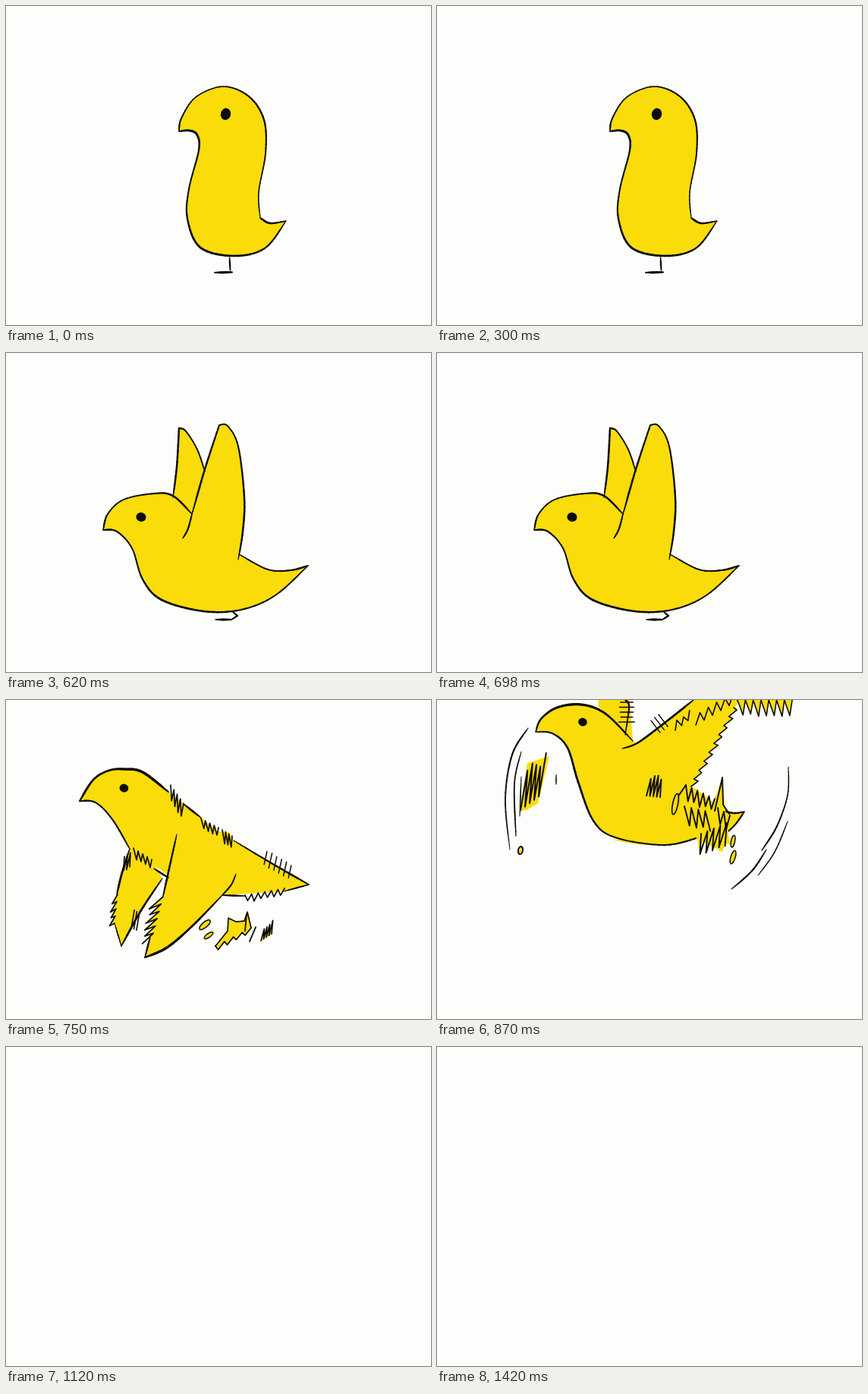
Recreate the animation shown at these times as an HTML page with a canvas. Size 560 by 420 pixels, loop 1.62 s.

```html
<!DOCTYPE html>
<html lang="en">
<head>
<meta charset="utf-8">
<title>Yellow bird takes off</title>
<style>
html, body { margin: 0; width: 100%; height: 100%; overflow: hidden; background: #fdfdfb; }
canvas { display: block; width: 560px; height: 420px; }
</style>
</head>
<body>
<canvas id="stage" width="560" height="420"></canvas>
<script>
const ctx = document.getElementById('stage').getContext('2d');
const PAPER = '#fdfdfb', YELLOW = '#f9dc0a', INK = '#0c0b06';
ctx.lineCap = ctx.lineJoin = 'round';

const mix = (a, b, t) => a + (b - a) * t;
const wobble = i => 0.85 + 0.3 * Math.abs(Math.sin(i * 12.9898) * 43758.5453 % 1);

// Smooth curve through a few places; "|" marks a corner.
function curve(text) {
  const out = [];
  let last;
  for (const part of text.split('|')) {
    const n = part.trim().split(' ').map(Number), p = last ? [last] : [];
    while (n.length) p.push(n.splice(0, 2));
    last = p[p.length - 1];
    for (let i = 0; i < p.length - 1; i++) {
      const b = p[i], c = p[i + 1], a = p[i - 1] || b, d = p[i + 2] || c;
      for (let t = 0; t < 1; t += 0.125) {
        out.push([0, 1].map(j => b[j] + t * ((c[j] - a[j]) / 2 +
          t * (a[j] - 2.5 * b[j] + 2 * c[j] - d[j] / 2 +
          t * (1.5 * (b[j] - c[j]) + (d[j] - a[j]) / 2)))));
      }
    }
  }
  return [...out, last];
}

// Zigzag from one place to another, every second point pushed aside.
function zig(n, x0, y0, x1, y1, dx, dy) {
  return Array.from({ length: n + 1 }, (_, i) => {
    const k = i % 2 * wobble(i + x0);
    return [mix(x0, x1, i / n) + dx * k, mix(y0, y1, i / n) + dy * k];
  });
}

const back = line => [...line].reverse();

function trace(points) {
  ctx.beginPath();
  points.forEach(p => ctx.lineTo(...p));
}

function fill(...lines) {
  trace(lines.flat());
  ctx.fillStyle = YELLOW;
  ctx.fill();
}

function scratch(w, ...lines) {
  ctx.strokeStyle = INK;
  ctx.lineWidth = w;
  for (const line of lines) {
    trace(line);
    ctx.stroke();
  }
}

// Brush line whose weight swells gently and thins at both ends.
function ink(w, ...lines) {
  for (const p of lines) {
    const n = p.length - 1;
    for (let i = 0; i < n; i++) {
      const end = Math.min(1, 0.6 + Math.min(i, n - 1 - i) / 8);
      scratch(w * end * (1 + 0.18 * Math.sin(i * 0.16 + p[0][0])), [p[i], p[i + 1]]);
    }
  }
}

// Row of short hairs centred on a line.
function comb(w, n, x0, y0, x1, y1, dx, dy) {
  for (let i = 0; i < n; i++) {
    const x = mix(x0, x1, i / (n - 1)), y = mix(y0, y1, i / (n - 1));
    const k = wobble(i + x0) / 2;
    scratch(w, [[x - dx * k, y - dy * k], [x + dx * k, y + dy * k]]);
  }
}

function oval(x, y, rx, ry, turn, color, line) {
  ctx.beginPath();
  ctx.ellipse(x, y, rx, ry, turn, 0, 7);
  ctx.fillStyle = color;
  ctx.fill();
  if (line) {
    ctx.strokeStyle = INK;
    ctx.lineWidth = line;
    ctx.stroke();
  }
}

const eye = (x, y, rx, ry) => oval(x, y, rx, ry, 0.25, INK);

function foot(leg, sole, w = 3) {
  ink(2.4, curve(leg));
  ink(w, curve(sole));
}

function standing() {
  const spine = curve('228 165 231 148 250 120 286 106 320 119 340 150 342 194 333 245 335 279');
  const tail = curve('335 279 348 286 369 283');
  const belly = curve('369 283 341 319 300 329 256 318 239 280 241 241 254 190 252 170 242 164 228 165');
  fill(spine, tail, belly);
  ink(1.9, spine);
  ink(2.4, tail, belly);
  eye(289.5, 142.3, 6.6, 7.8);
  foot('294.5 331 295.5 348', '275 351 298 350.5', 3.8);
}

function feathering() {
  const head = curve('140 213 152 186 178 173 205 170 232 175 260 206');
  const chest = curve('140 213 156 215 173 230 180 268 203 307 255 331 300 335 350 323 403 283');
  const tail = curve('403 283 385 287 350 284 313 261');
  const wing = curve('242 234 262 203 310 164 345 152 375 152');
  const tips = zig(9, 375, 152, 338, 207, 3, -8);
  const inner = curve('338 207 322 236 312 269');
  const rear = curve('282 106 281 140 279 187');
  fill(curve('234 179 248 138 282 106|285 112 281 120'), rear, [[258, 206]]);
  fill(head, back(tail), back(chest));
  fill(wing, tips, inner, [[260, 285]]);
  ink(2.2, head, chest, tail, inner);
  ink(2, wing, rear, curve('234 179 242 151 252 135'));
  scratch(2.1, tips);
  comb(1.6, 8, 254, 131, 277, 110, -1, 26);
  comb(1.6, 9, 318, 160, 356, 145, 1, 31);
  const top = zig(9, 334, 204, 372, 201, 2, 11);
  const side = curve('372 201 380 228 376 262');
  const hem = zig(9, 376, 262, 337, 228, 0, -13);
  fill(top, side, hem);
  scratch(2, top, hem);
  ink(2.3, side);
  oval(319.5, 206, 1.4, 7.3, 0, '#544a0a', 1.6);
  eye(190, 200, 6.7, 6.4);
  foot('295 336 303 342|298 349', '276 351 298 350.5');
}

function wingsUp() {
  const rear = curve('220 190 225 150 228 99|237 103 252 127 262 156');
  const head = curve('128 233 134 212 155 193 195 185 220 188 245 212');
  const wing = curve('246 209 262 153 281 95|292 96 306 123 314 190 312 235 306 272');
  const under = curve('128 233 146 235 166 257 180 298 205 325 260 340 310 338 355 319 398 280');
  const tail = curve('398 280 375 286 345 285 307 265');
  fill(rear, [[245, 212]]);
  fill(head, back(tail), back(under));
  fill(wing, [[246, 272]]);
  ink(2.1, rear, head, wing);
  ink(2.3, under, tail);
  ink(1.8, curve('233 244 240 231 246 208'));
  eye(178, 216, 6.6, 6);
  foot('299 341 305 346|297 351', '276 351 297 351');
}

function downstroke() {
  const head = curve('97 133 115 105 135 93 155 91 180 95 214 121');
  const chest = curve('97 133 118 135 140 157 163 196');
  const spine = curve('300 185 350 215 399 243');
  const rearEdge = curve('163 196 153 227 146 256');
  const rearTuft = zig(8, 147, 256, 143, 294, -7, 8);
  const rearTip = curve('143 294 152 324');
  const rearBack = curve('152 324 178 277 206 235');
  const wing = curve('225 177 217 213 207 258');
  const tuft = zig(11, 207, 259, 193, 312, -15, 10);
  const tip = curve('190 312 183 339');
  const wingBack = curve('183 339 212 326 245 298 285 257');
  const armpit = curve('285 257 297 243 303 229');
  fill(rearEdge, rearTuft, rearTip, rearBack, [[195, 215]]);
  fill(head, curve('235 137|259 156|278 173|294 174'), spine,
    curve('366 252|285 257|220 235|163 196'), back(chest));
  fill(wing, tuft, tip, wingBack, armpit);
  ink(3, head);
  ink(2.3, chest, rearEdge, rearBack, wing, spine);
  ink(2.3, curve('234 137 257 155'), curve('195 222 214 234'), curve('399 243 366 252'), curve('285 257 315 258'));
  ink(2.8, wingBack);
  ink(2, armpit, rearTip, tip);
  scratch(1.7, rearTuft, tuft,
    zig(8, 217, 112, 234, 136, -1, 20),
    zig(8, 257, 156, 280, 168, 1, 13),
    zig(6, 285, 171, 298, 179, 1, 17),
    zig(12, 315, 257, 367, 248, -1, 9),
    zig(5, 156, 206, 166, 200, -3, 20),
    zig(8, 168, 195, 192, 210, 1, 13));
  comb(1.5, 6, 342, 208, 374, 226, -4, 18);
  comb(1.6, 3, 167, 289, 174, 291, -4, 23);
  const shard = curve('276 324|292 304|293 287|303 292|314 291|318 279|323 300');
  const hem = zig(8, 323, 300, 276, 324, -2, 7);
  const speck = zig(8, 336, 317, 350, 308, 3, -17);
  fill(shard, hem);
  fill(speck);
  scratch(1.7, shard, hem, speck);
  scratch(1.8, curve('315 304 317 282'), curve('321 318 329 299'));
  oval(262, 296, 9, 3.5, -0.7, YELLOW, 1.5);
  oval(267, 310, 7, 2.5, -0.6, YELLOW, 1.4);
  eye(155.5, 116, 5.9, 5.4);
}

function climbing() {
  const head = curve('130 42 137 25 158 10 190 6 222 18 258 54');
  const chest = curve('130 42 152 44 172 63 186 108 206 159 235 181 300 191 348 180');
  const wing = curve('244 64 265 56 300 30 338 0');
  const barbs = zig(18, 391, 10, 332, 116, 8, -3);
  const rump = curve('405 147 393 164 379 177');
  const tail = curve('378 146 392 149 405 147');
  const fringe = zig(14, 396, 0, 468, 0, 2, 20);
  fill(curve('213 0|212 8|258 54|254 0'));
  fill(head, curve('338 108|330 125|360 150'), tail, rump, back(chest));
  fill(curve('228 183 265 190 320 191'));
  fill(wing, [[402, 0]], barbs, [[285, 120]]);
  fill(fringe);
  ink(2.7, head);
  ink(2.3, chest, wing, rump, curve('248 0 253 9 248 46'));
  ink(2, tail);
  scratch(1.6, barbs, fringe, zig(5, 314, 40, 335, 24, -2, -9), zig(10, 341, 33, 396, 1, 0, -14));
  comb(1.4, 5, 250, 3, 250, 29, 18, 0);
  comb(1.4, 3, 288, 35, 298, 27, 13, 17);
  scratch(1.9, zig(8, 276, 126, 294, 128, 4, -25));
  oval(314, 137, 3.5, 14, 0.2, YELLOW, 1.7);
  fill(curve('326 111|341 117|364 135|376 102|380 147|384 174|376 200|342 182'));
  fill(zig(9, 342, 176, 386, 160, 0, 30));
  scratch(1.9, curve('319 125|328 112'), zig(10, 328, 112, 366, 130, -1, 18),
    curve('366 146|376 102|377 138|385 150'),
    zig(7, 326, 140, 358, 147, 2, 23),
    zig(9, 348, 176, 386, 160, -6, 30),
    zig(4, 370, 142, 386, 152, -1, 20));
  oval(390, 186, 2.5, 8, 0.2, YELLOW, 1.5);
  oval(390, 207, 3, 9, 0.3, YELLOW, 1.5);
  ink(1.8, curve('463 88 462 125 448 166 428 198'), curve('462 160 445 200 423 231'),
    curve('434 197 415 225 388 249'), curve('120 37 99 72 90 130 96 197'));
  ink(2, curve('111 68 102 110 104 179'), curve('111 101 109 153'));
  fill(curve('109 146|119 83|148 74|133 136|118 145'));
  scratch(2, zig(9, 110, 145, 137, 125, 6, -48));
  ink(1.3, curve('157 98 157 111'));
  oval(110, 198, 3, 5, 0.2, YELLOW, 2);
  eye(192, 29, 5.8, 5.4);
}

function leaving() {
  const chest = curve('205 0 222 18 252 43');
  const rearEdge = curve('178 36 177 54 179 76');
  const rearBack = curve('228 35 215 70 206 102');
  const rearTuft = zig(18, 181, 78, 201, 133, -11, 8);
  const wing = curve('257 54 255 80 249 106');
  const wingTip = zig(10, 249, 106, 253, 140, -13, 9);
  const wingBack = curve('253 140 275 131 298 110');
  const armpit = curve('319 85 331 60 335 32');
  const spine = curve('338 0 385 23 430 43');
  fill([[184, 0]], rearEdge, rearTuft, [[214, 120]], back(rearBack), [[250, 47], [259, 0]]);
  fill(chest, curve('256 46|329 62|380 58'), back(spine));
  fill([[259, 0]], wing, wingTip, wingBack, armpit, [[335, 0]]);
  ink(2.5, chest, rearEdge, rearBack, wing, wingBack, spine, curve('259 0 258 22'));
  ink(2, armpit, curve('430 43 400 53'), curve('329 62 362 60'), curve('335 5 343 0'));
  scratch(1.6, rearTuft, wingTip,
    zig(8, 187, 0, 180, 37, -8, 5),
    zig(10, 194, 102, 209, 130, 11, 2),
    zig(18, 279, 8, 281, 48, -29, 5),
    zig(10, 362, 49, 397, 47, 2, 18));
  comb(1.5, 6, 388, 18, 407, 34, -6, 19);
  comb(1.4, 6, 226, 34, 208, 84, 12, 10);
  comb(1.4, 3, 175, 46, 176, 72, 17, 6);
  comb(1.4, 3, 259, 69, 247, 92, 20, -2);
  comb(1.5, 2, 330, 60, 337, 62, 9, -14);
  const shard = curve('302 101|333 91|330 101|345 99|367 114|351 125|330 129');
  const hem = zig(8, 330, 129, 302, 103, 8, 0);
  fill(shard, hem);
  scratch(1.7, shard, hem);
  oval(140.5, 76, 3, 11, -0.25, YELLOW, 1.8);
  const speck = zig(9, 150, 87, 168, 101, 2, -15);
  fill(speck);
  scratch(1.8, speck);
  oval(236, 156, 6.2, 2.1, -0.18, YELLOW, 2);
}

const LOOP = 1620;
const start = performance.now();
let shown;

function poseAt(t) {
  if (t < 500) return standing;
  if (t < 620) return feathering;
  if (t < 750) return wingsUp;
  if (t < 870) return downstroke;
  if (t < 1000) return climbing;
  return t < 1120 ? leaving : null;
}

function tick() {
  const pose = poseAt((performance.now() - start) % LOOP);
  if (pose !== shown) {
    ctx.fillStyle = PAPER;
    ctx.fillRect(0, 0, 560, 420);
    if (pose) pose();
    shown = pose;
  }
  requestAnimationFrame(tick);
}
tick();
</script>
</body>
</html>
```
